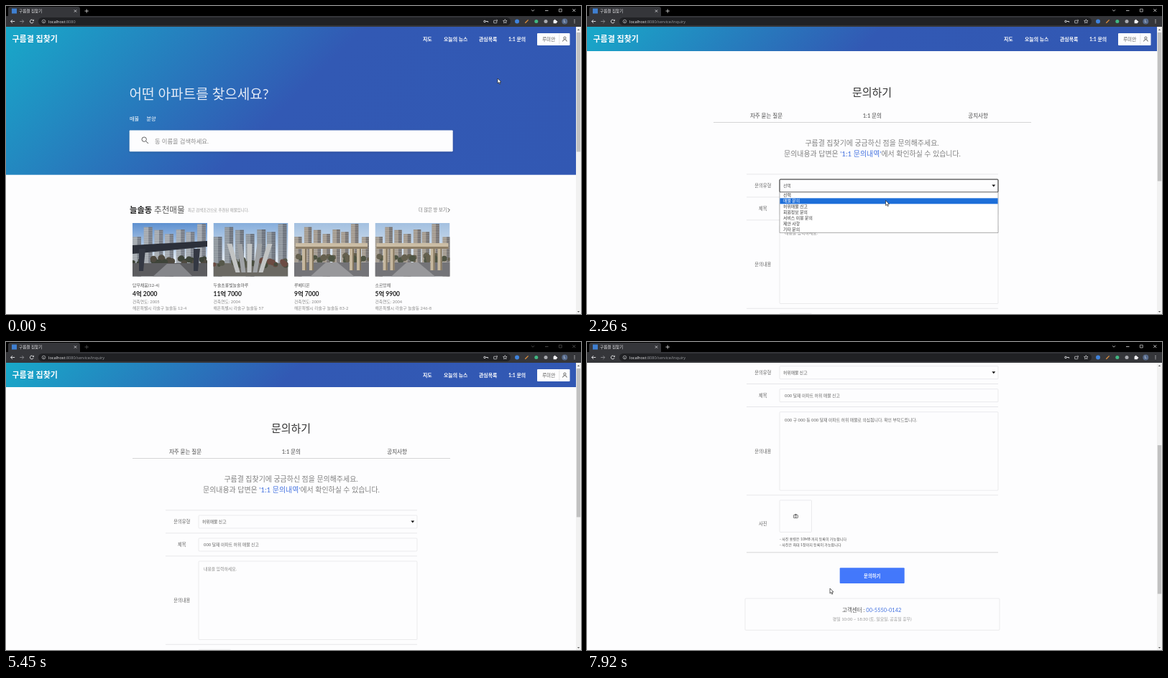
An HTML page with a canvas for the animation above (8000 ms loop, 800 px wide and 430 px high).

```html
<!DOCTYPE html>
<html lang="ko">
<head>
<meta charset="utf-8">
<title>구름결 집찾기</title>
<style>
html, body { margin: 0; width: 100%; height: 100%; overflow: hidden; background: #fdfdfe; }
canvas { display: block; width: 800px; height: 430px; }
</style>
</head>
<body>
<canvas id="stage"></canvas>
<script>
const LOOP = 8000, STEP = 102.857;
const BRAND = '구름결 집찾기';
const PAPER = '#fdfdfe', EDGE = '#e2e2e5', LINK = '#4573e0';
const PAGE = "Lato, 'Noto Sans CJK KR', sans-serif";
const UI = "'Open Sans', 'Noto Sans CJK KR', sans-serif";
const canvas = document.getElementById('stage');
const c = canvas.getContext('2d');
const ratio = window.devicePixelRatio || 1;
canvas.width = 800 * ratio;
canvas.height = 430 * ratio;

// ---- drawing helpers ----
const clamp01 = v => Math.min(1, Math.max(0, v));
const ramp = (k, a, b) => clamp01((k - a) / (b - a));
const smooth = u => u * u * (3 - 2 * u);
const within = (k, a, b) => k >= a && k < b;

function rect(x, y, w, h, fill) {
  c.fillStyle = fill;
  c.fillRect(x, y, w, h);
}
function box(x, y, w, h, fill, stroke, r = 1, lw = 0.7) {
  c.beginPath();
  c.roundRect(x, y, w, h, r);
  if (fill) { c.fillStyle = fill; c.fill(); }
  if (stroke) { c.strokeStyle = stroke; c.lineWidth = lw; c.stroke(); }
}
function dot(x, y, r, fill) {
  c.beginPath();
  c.arc(x, y, r, 0, Math.PI * 2);
  c.fillStyle = fill;
  c.fill();
}
function ring(x, y, r, color, lw = 0.8, from = 0, to = Math.PI * 2) {
  c.beginPath();
  c.arc(x, y, r, from, to);
  c.strokeStyle = color;
  c.lineWidth = lw;
  c.stroke();
}
function trace(pts) {
  c.beginPath();
  for (let i = 0; i < pts.length; i += 2) c.lineTo(pts[i], pts[i + 1]);
}
function line(color, lw, ...pts) {
  trace(pts);
  c.strokeStyle = color;
  c.lineWidth = lw;
  c.stroke();
}
function poly(fill, ...pts) {
  trace(pts);
  c.closePath();
  c.fillStyle = fill;
  c.fill();
}
// an open angle of size s with its tip turned by `turn` quarter circles from the right
function chevron(x, y, s, turn, color, lw = 0.9) {
  c.save();
  c.translate(x, y);
  c.rotate(turn * Math.PI / 2);
  line(color, lw, -s, -s, 0, 0, -s, s);
  c.restore();
}
function cross(x, y, s, color, angle) {
  c.save();
  c.translate(x, y);
  c.rotate(angle);
  line(color, 0.8, -s, 0, s, 0);
  line(color, 0.8, 0, -s, 0, s);
  c.restore();
}
// y is the optical middle of the line; returns the x where the text ends
function text(s, x, y, size, color, { w = 400, align = 'left', font = PAGE } = {}) {
  c.font = `${w} ${size}px ${font}`;
  c.textAlign = align;
  c.fillStyle = color;
  c.fillText(s, x, y + size * 0.37);
  return x + c.measureText(s).width;
}
const MID = { align: 'center' }, BOLD = { w: 700 };

// ---- browser frame ----
function chrome(k) {
  const away = within(k, 35, 38) || within(k, 52, 60);
  const ctl = away ? '#555' : '#ddd', icon = '#d6d7da', y = 21.5;
  rect(0, 0, 800, 14, '#000');
  box(3, 1, 100, 16, '#35363a', null, 3);
  rect(0, 14, 800, 15, '#35363a');
  rect(8, 3.5, 7, 7, '#3f7fd0');
  text(BRAND, 18, 7, 5.6, '#e4e5e8', { font: UI });
  cross(96.5, 7, 2.3, icon, Math.PI / 4);
  cross(112.2, 7, 2.7, ctl, 0);
  chevron(733, 7.2, 2, 1, ctl, 0.8);
  line(ctl, 0.8, 750, 6.5, 754.5, 6.5);
  box(769.4, 4.2, 3.8, 3.8, null, ctl, 0);
  cross(790.3, 6.1, 2.8, ctl, Math.PI / 4);

  line('#e8e8ea', 0.9, 6.6, y, 12.2, y);
  chevron(6.6, y, 2.4, 2, '#e8e8ea');
  line('#8b8c90', 0.9, 19.2, y, 24.8, y);
  chevron(24.8, y, 2.4, 0, '#8b8c90');
  ring(35.8, y, 2.4, '#e8e8ea', 0.9, 0.3, 5.5);
  poly('#e8e8ea', 36.6, 20.9, 38.8, 20.9, 38.8, 18.6);
  box(45, 16, 657, 11, '#202124', null, 5.5);
  ring(52.5, y, 2.3, '#c8c9cc', 0.7);
  line('#c8c9cc', 0.7, 52.5, 21, 52.5, 23);
  const end = text('localhost', 59, y, 5.6, '#f0f0f2', { font: UI });
  text(k < 11 ? ':8080' : ':8080/service/inquiry', end, y, 5.6, '#9a9ca1', { font: UI });

  ring(666, y, 1.3, icon, 1);
  line(icon, 1, 667.4, y, 670.6, y, 670.6, 22.8);
  box(678.6, 20.2, 4.2, 3.6, null, icon, 0.4);
  chevron(683.8, 20, 1.3, 0, icon, 0.7);
  const star = [];
  for (let i = 0; i <= 10; i++) {
    const r = i % 2 ? 1.3 : 2.9, a = i * Math.PI / 5 - Math.PI / 2;
    star.push(694.3 + r * Math.cos(a), y + r * Math.sin(a));
  }
  line(icon, 0.7, ...star);
  dot(711, y, 3, '#3f83dc');
  line('#e2903c', 1.3, 722.3, 23.8, 726.6, 19.4);
  dot(737.8, y, 2.5, '#41b883');
  dot(751, y, 2.5, '#a9abb0');
  box(761.6, 20, 4.4, 4.2, '#f0f0f2', null, 0.5);
  dot(763.6, 19.8, 1.1, '#f0f0f2');
  dot(766.2, 22, 1.1, '#f0f0f2');
  dot(777.3, y, 4, '#566a8c');
  text('L', 777.3, y, 5, '#fff', { align: 'center', font: UI });
  for (let i = -1; i <= 1; i++) dot(791, y + i * 2.1, 0.65, icon);
}

function scrollbar(top, h) {
  rect(793, 29, 7, 401, '#f1f1f1');
  poly('#555', 794.9, 34, 796.5, 32.2, 798.1, 34);
  poly('#555', 794.9, 426, 796.5, 427.8, 798.1, 426);
  rect(793.8, top, 5.4, h, '#c1c1c1');
}

// ---- site header ----
function banner(h, hover) {
  // 135 degree gradient across a 793 by h box
  const d = (793 + h) / 4, mx = 396.5, my = 29 + h / 2;
  const g = c.createLinearGradient(mx - d, my - d, mx + d, my + d);
  g.addColorStop(0, '#18a9c9');
  g.addColorStop(0.5, '#3259b4');
  g.addColorStop(1, '#3258b3');
  rect(0, 29, 793, h, g);
  text(BRAND, 8.5, 46, 11, '#fff', BOLD);
  text('지도', 580, 46, 6.9, '#fff', BOLD);
  text('오늘의 뉴스', 609, 46, 6.9, '#fff', BOLD);
  text('관심목록', 658, 46, 6.9, '#fff', BOLD);
  text('1:1 문의', 699, 46, 6.9, '#fff', { w: hover ? 900 : 700 });
  box(739, 38, 45.5, 17, PAPER, null, 1);
  text('루미안', 746, 46.4, 6.6, '#555');
  line('#d4d4d4', 0.6, 769.8, 38.5, 769.8, 54.5);
  ring(777.4, 44.6, 1.6, '#444', 0.8);
  ring(777.4, 49.6, 2.8, '#444', 0.8, Math.PI, Math.PI * 2);
}

// ---- home page ----
function random(seed) {
  return () => {
    seed = (seed * 16807) % 2147483647;
    return seed / 2147483647;
  };
}
// a skyline of n towers with floors, side shade and a hazy sky
function skyline(rnd, n, sky, tone) {
  const g = c.createLinearGradient(0, 0, 0, 50);
  g.addColorStop(0, sky);
  g.addColorStop(1, '#dfe8f1');
  rect(0, 0, 104, 75, g);
  const gap = 104 / n;
  for (let i = 0; i < n; i++) {
    const x = i * gap + rnd() * 3, w = gap * 0.8, top = 1 + rnd() * 20;
    rect(x, top, w, 60, tone);
    rect(x + w * 0.55, top, w * 0.45, 60, 'rgba(45,52,66,.4)');
    for (let y = top + 2; y < 58; y += 2.5) rect(x, y, w, 0.8, 'rgba(230,234,238,.35)');
  }
}
function hedge(rnd, y, colors) {
  for (let i = 0; i < 30; i++) {
    dot(rnd() * 104, y + rnd() * 7, 2 + rnd() * 3, colors[i % colors.length]);
  }
}
const scenes = {
  canopy(rnd) {
    skyline(rnd, 7, '#5d90d0', '#a0a5ab');
    hedge(rnd, 49, ['#3e4439', '#4f4a40']);
    rect(0, 56, 104, 19, '#5c5c5f');
    poly('#2c303a', 0, 31, 104, 25, 104, 33, 0, 43);
    for (const x of [9, 85]) poly('#343843', x, 36, x + 9, 36, x + 6, 67, x, 67);
    poly('#85868a', 28, 75, 48, 57, 66, 57, 84, 75);
  },
  pillars(rnd) {
    skyline(rnd, 7, '#86aedc', '#8b9299');
    rect(0, 56, 104, 19, '#6b6963');
    hedge(rnd, 52, ['#474c3d', '#6b4b42', '#56584a']);
    for (let i = -2; i <= 2; i++) {
      const x = 50 + i * 11;
      poly(i % 2 ? '#a0a3a6' : '#c2c4c4', x - 3 + i * 3, 29, x + 4 + i * 3, 29, x + 3 - i * 3, 69, x - 3 - i * 3, 69);
    }
  },
  gate(rnd) {
    skyline(rnd, 8, '#a3c0e0', '#a0968a');
    hedge(rnd, 46, ['#4f5544', '#65604f']);
    rect(0, 55, 104, 20, '#747478');
    poly('#98989b', 22, 75, 44, 55, 60, 55, 84, 75);
    rect(2, 28, 100, 8, '#cbbda5');
    rect(2, 33, 100, 3, '#8c7d66');
    for (const x of [11, 21, 77, 87]) {
      rect(x, 36, 6, 30, '#c6b89f');
      rect(x + 4, 36, 2, 30, '#85775f');
    }
  }
};
function photo(x, scene) {
  c.save();
  c.translate(x, 303);
  c.beginPath();
  c.rect(0, 0, 104, 74.5);
  c.clip();
  scenes[scene](random(4021));
  c.restore();
}
const homes = [
  ['담우채움(12-4)', '4억 2000', 2005, '12-4', 'canopy'],
  ['두솔초롱빛늘솔마루', '11억 7000', 2004, '57', 'pillars'],
  ['루베티온', '9억 7000', 2009, '83-2', 'gate'],
  ['소르망채', '5억 9900', 2004, '246-8', 'gate']
];
function homePage(hover) {
  banner(206.7, hover);
  text('어떤 아파트를 찾으세요?', 171.5, 123.3, 19.1, '#e4ebf7');
  text('매물', 172, 157.5, 7.2, '#fff');
  text('분양', 195.5, 157.5, 7.2, '#fff');
  c.save();
  c.shadowColor = 'rgba(0,0,0,.15)';
  c.shadowBlur = 3;
  c.shadowOffsetY = 1;
  box(171.7, 173.6, 450, 29.6, PAPER);
  c.restore();
  ring(192.2, 186.2, 3.2, '#555', 0.9);
  line('#555', 1, 194.6, 188.6, 198, 192);
  text('동 이름을 검색하세요.', 207, 188.5, 8.3, '#8a8a8a');

  text('늘솔동', 172, 285, 11.3, '#222', BOLD);
  text('추천매물', 206, 285, 11.6, '#555');
  text('최근 검색조건으로 추천된 매물입니다.', 253, 284.8, 5.4, '#999');
  text('더 많은 방 보기', 574, 285, 6.3, '#777');
  chevron(617.4, 285, 2.7, 0, '#555', 1);
  homes.forEach(([name, price, year, lot, scene], i) => {
    const x = 176 + i * 112.5;
    photo(x, scene);
    text(name, x, 389.5, 5.9, '#555');
    text(price, x, 401.5, 8.5, '#222', BOLD);
    text('건축연도: ' + year, x, 413, 5.8, '#888');
    text('해온특별시 라솔구 늘솔동 ' + lot, x, 421.5, 5.8, '#888');
  });
}

// ---- inquiry page ----
const options = ['선택', '매물 문의', '허위매물 신고', '회원정보 문의', '서비스 이용 문의', '제안 사항', '기타 문의'];

function dropdown(mouse) {
  const row = Math.max(0, Math.floor((mouse.y - 260) / 8));
  box(268, 242, 304, 18, null, '#222', 1, 1);
  box(268, 260, 304, 56.6, '#fff', '#777', 0, 0.6);
  options.forEach((s, i) => {
    const on = i === row, y = 260.3 + i * 8;
    if (on) rect(268.4, y, 303.2, 8, '#1e6fd9');
    text(s, 273, y + 4, 5.9, on ? '#fff' : '#333');
  });
}
function formRow(name, y, h) {
  const mid = y + h / 2;
  rect(222, y - 7.5, 350, 0.8, EDGE);
  text(name, 244.8, mid, 6.3, '#666', MID);
  return mid;
}
function inquiryPage(k, scroll, mouse, hover) {
  c.save();
  c.translate(0, -scroll);
  banner(34, hover);
  text('문의하기', 396.5, 120, 15, '#333', MID);
  ['자주 묻는 질문', '1:1 문의', '공지사항'].forEach((s, i) => text(s, 249.5 + i * 147.3, 153, 7.5, '#444', MID));
  rect(176, 162, 442, 0.8, '#ccc');
  text(BRAND + '에 궁금하신 점을 문의해주세요.', 396.5, 191, 9.95, '#808080', MID);
  let x = text('문의내용과 답변은 ', 274, 206, 9.95, '#808080');
  x = text("'1:1 문의내역'", x, 206, 9.95, LINK);
  text('에서 확인하실 수 있습니다.', x, 206, 9.95, '#808080');

  const field = (y, h) => box(268, y, 304, h, PAPER, EDGE);
  const typeY = formRow('문의유형', 242, 18);
  field(242, 18);
  text(options[k < 26 ? 0 : 2], 273, typeY, 5.8, '#555');
  poly('#111', 563.4, 249.6, 568.2, 249.6, 565.8, 252.6);
  const titleY = formRow('제목', 274, 18);
  field(274, 18);
  if (k >= 46) text('000 달재 아파트 허위 매물 신고', 275, titleY, 5.85, '#666');
  formRow('문의내용', 306, 109.5);
  field(306, 109.5);
  const body = k < 65 ? '내용을 입력하세요.' : '000 구 000 동 000 달재 아파트 허위 매물로 의심됩니다. 확인 부탁드립니다.';
  text(body, 275, 317.3, 5.85, k < 65 ? '#888' : '#666');
  formRow('사진', 429.3, 66.4);
  box(268, 429.3, 44.5, 44.5, null, EDGE);
  box(287.4, 449.8, 6, 4.2, null, '#555', 0.7, 0.8);
  rect(289.2, 448.5, 2.4, 1, '#555');
  ring(290.4, 451.9, 1.1, '#555', 0.7);
  text('- 사진 용량은 10MB 까지 등록이 가능합니다', 268, 483.6, 5.05, '#555');
  text('- 사진은 최대 1장까지 등록이 가능합니다', 268, 491.3, 5.05, '#555');
  rect(222, 501.8, 350, 0.8, '#ccc');

  box(351.7, 523.6, 90, 21.8, '#4378fb');
  text('문의하기', 396.7, 535, 6.3, '#fff', { w: 700, align: 'center' });
  box(220, 566.4, 354, 44.2, null, EDGE);
  x = text('고객센터 : ', 355, 582.5, 7.5, '#555');
  text('00-5550-0142', x, 582.5, 7.5, LINK);
  text('평일 10:00 ~ 18:30 (토, 일요일, 공휴일 휴무)', 396.7, 595, 5.9, '#999', MID);
  rect(0, 652, 793, 120, '#333337');
  if (within(k, 18, 26)) dropdown(mouse);
  c.restore();
}

function statusBar() {
  rect(0, 425, 72, 5, '#202124');
  text('localhost:8080/service/inquiry', 2, 428.4, 5, '#e0e0e2', { font: UI });
}

// ---- pointer ----
// stops are [step, x, y]; the pointer is hidden between tracks
const tracks = [
  [[0, 684, 101], [8, 708, 46], [11, 708, 46], [15, 420, 250], [18, 420, 250], [24, 414, 279], [27, 414, 279]],
  [[38, 420, 284], [46, 432, 284], [49, 466, 306]],
  [[61, 420, 330], [65, 410, 330], [70, 206, 312], [73, 206, 312], [77, 338, 344]]
];
function pointer(k) {
  const stops = tracks.find(t => k >= t[0][0] && k <= t[t.length - 1][0]);
  if (!stops) return null;
  const i = Math.max(1, stops.findIndex(s => k <= s[0]));
  const [k0, x0, y0] = stops[i - 1], [k1, x1, y1] = stops[i];
  const e = smooth(ramp(k, k0, k1));
  return { x: x0 + (x1 - x0) * e, y: y0 + (y1 - y0) * e };
}
function drawPointer({ x, y }, k, hover) {
  const overText = within(k, 38, 73) && within(x, 268, 572);
  c.save();
  c.translate(x, y);
  if (hover) {
    c.beginPath();
    c.roundRect(-0.6, 0, 1.8, 6, 0.9);
    c.roundRect(-1.6, 3, 5.4, 5.4, 1.5);
    c.strokeStyle = '#222';
    c.lineWidth = 1;
    c.stroke();
    c.fillStyle = '#fff';
    c.fill();
  } else if (overText) {
    line('#222', 0.8, 0, -3.8, 0, 3.8);
    for (const end of [-3.8, 3.8]) line('#222', 0.7, -1.4, end, 1.4, end);
  } else {
    poly('#fff', 0, 0, 0, 7, 1.6, 5.6, 2.8, 8.1, 3.9, 7.6, 2.8, 5.2, 4.9, 5);
    c.strokeStyle = '#222';
    c.lineWidth = 0.7;
    c.stroke();
  }
  c.restore();
}

// ---- timeline ----
// six wheel notches down with a fast ease-out, then one notch back
function scrollAt(k) {
  const notch = 41.67;
  const down = 1 - Math.pow(1 - ramp(k, 72, 74), 3.6);
  return notch * (6 * down - smooth(ramp(k, 75, 77)));
}
function draw(time) {
  const k = Math.floor((time % LOOP + 4) / STEP);
  const mouse = pointer(k), scroll = scrollAt(k), hover = within(k, 7, 12);
  c.setTransform(ratio, 0, 0, ratio, 0, 0);
  rect(0, 0, 800, 430, PAPER);
  if (k < 11) {
    homePage(hover);
    scrollbar(37, 166.5);
  } else {
    inquiryPage(k, scroll, mouse, hover);
    scrollbar(37 + scroll * 0.514, 207.5);
  }
  if (hover) statusBar();
  chrome(k);
  if (mouse) drawPointer(mouse, k, hover);
}

let start;
function tick(now) {
  if (start === undefined) start = now;
  draw(now - start);
  requestAnimationFrame(tick);
}
draw(0);
requestAnimationFrame(tick);
</script>
</body>
</html>
```
